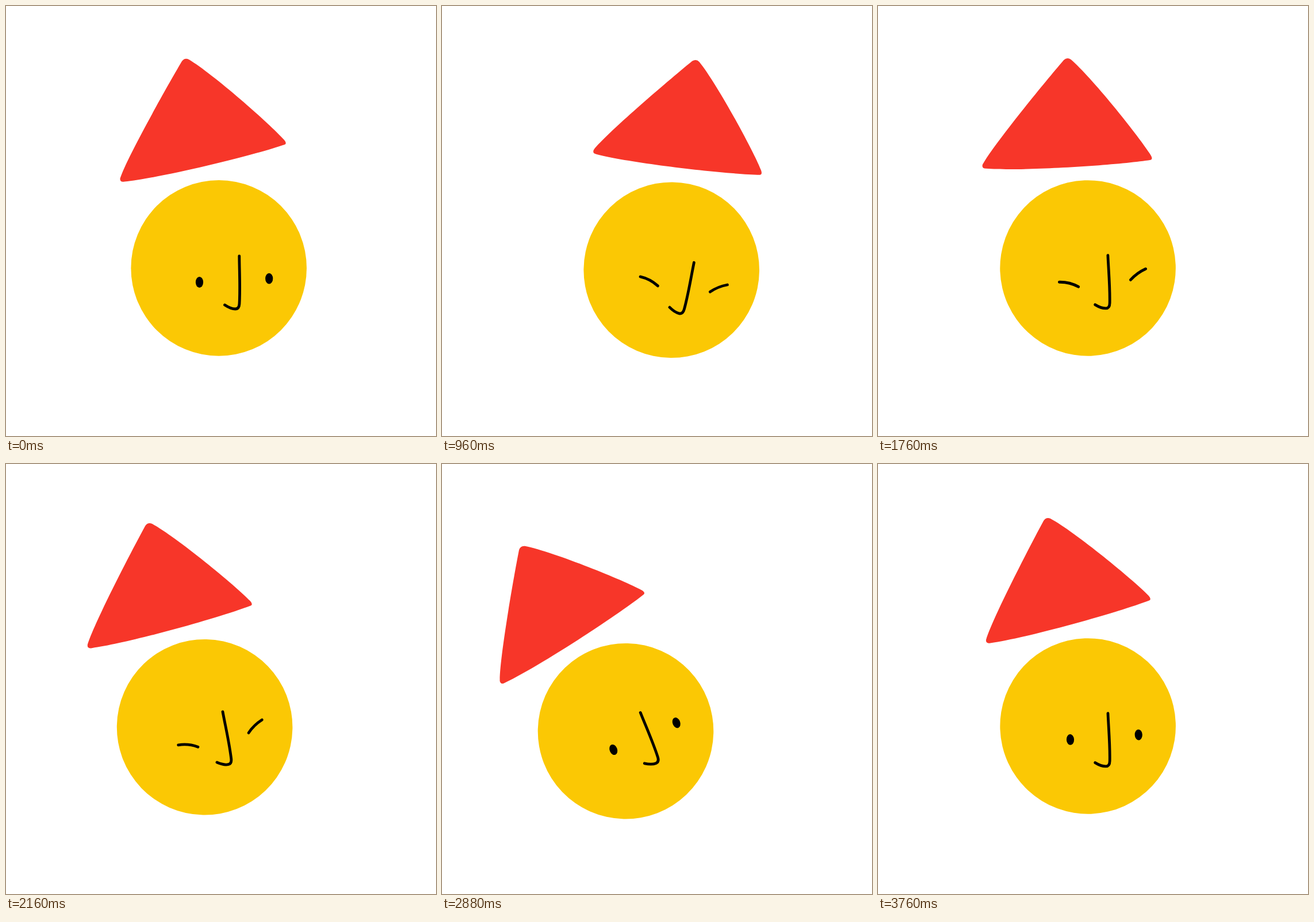
These frames come from a looping animation (748 by 748 pixels, 3.8 s). An HTML page:

```html
<!DOCTYPE html>
<html lang="en">
<head>
<meta charset="utf-8">
<title>Rocking head with hat</title>
<style>
  html, body { margin: 0; width: 100%; height: 100%; overflow: hidden; background: #fff; }
  svg { display: block; width: 100vw; height: 100vh; }
  .line { fill: none; stroke: #000; stroke-width: 4.8; stroke-linecap: round; stroke-linejoin: round; }
</style>
</head>
<body>
<svg viewBox="0 0 748 748">
  <g id="head">
    <circle cx="370.2" cy="455.9" r="152.8" fill="#fbc804"/>
    <path class="line" d="M405.8 435C406 462 407.6 490 406 518Q405.5 527 399 527Q391 527 380.5 520"/>
    <g id="open">
      <ellipse id="leftEye" rx="6.6" ry="9.4"/>
      <ellipse cx="457.7" cy="474.2" rx="6.6" ry="9.4"/>
    </g>
    <path id="closed" class="line" d="M319.6 478.4Q337.4 478.7 352.7 487.8M443.7 479.1Q455.2 467.2 470.6 460.9"/>
    <path id="hat" fill="#f73629" d="M306 96Q311 89.5 318 93C360 118 460 206 484 233Q489 239 485 241C430 260 270 299 206 305.5Q198 307 198.5 300C209 267 276 147 306 96Z"/>
  </g>
</svg>
<script>
  const LOOP = 3800, STEP = 40;
  const CLOSE = 600, MIDDLE = 1680, OPEN = 2800;
  const times = [0, CLOSE, MIDDLE, OPEN, LOOP];
  const headAngles = [0, 18.2, -0.5, -22.9, -1.2];
  const hatAngles = [0, 5.9, 12.9, 1.85, 0];
  const el = id => document.getElementById(id);
  const head = el('head'), hat = el('hat'), open = el('open'), closed = el('closed'), leftEye = el('leftEye');

  // Constant speed between poses, with sharp reversals.
  function tween(values, t) {
    let i = 0;
    while (t >= times[i + 1]) i++;
    const k = (t - times[i]) / (times[i + 1] - times[i]);
    return values[i] + (values[i + 1] - values[i]) * k;
  }

  function draw(t) {
    const asleep = t >= CLOSE && t < OPEN;
    head.setAttribute('transform', `rotate(${tween(headAngles, t)} 368.5 596)`);
    hat.setAttribute('transform', `rotate(${tween(hatAngles, t)} 340 262)`);
    open.style.display = asleep ? 'none' : '';
    closed.style.display = asleep ? '' : 'none';
    leftEye.setAttribute('cx', t < CLOSE ? 336.5 : 338.7);
    leftEye.setAttribute('cy', t < CLOSE ? 480.5 : 478.3);
  }

  const start = performance.now();
  function tick() {
    const t = (performance.now() - start) % LOOP;
    draw(Math.floor(t / STEP) * STEP);
    requestAnimationFrame(tick);
  }
  tick();
</script>
</body>
</html>
```
